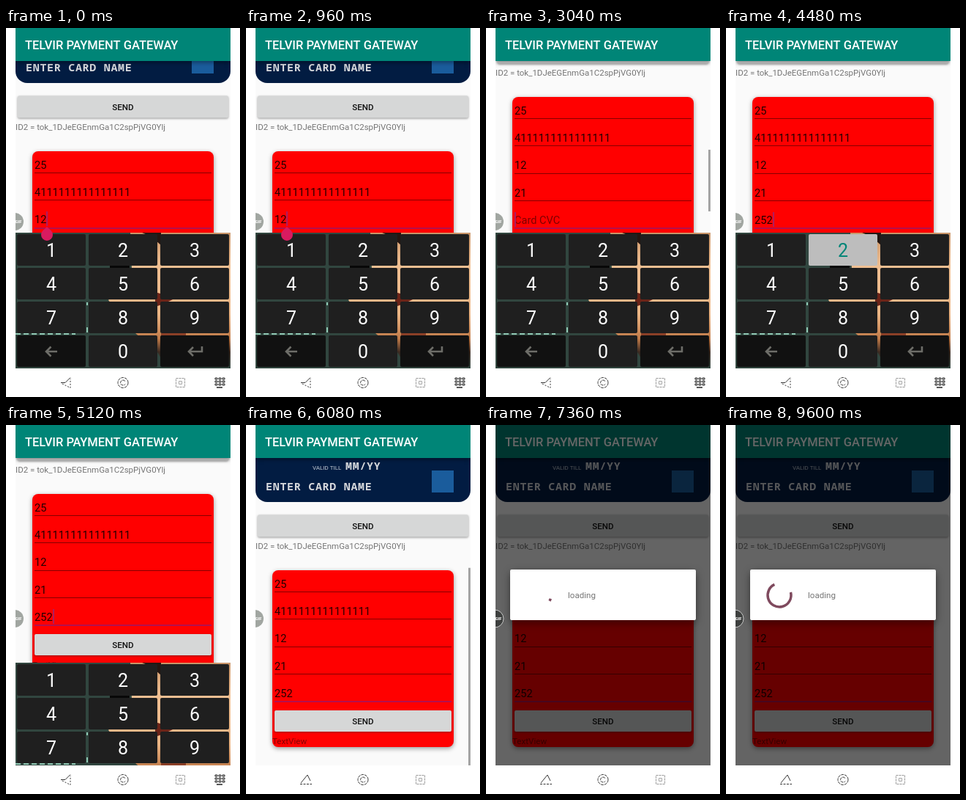
Recreate the animation shown at these times as an HTML page with a canvas. Size 320 by 503 pixels, loop 9.76 s.

```html
<!DOCTYPE html>
<html lang="en">
<head>
<meta charset="utf-8">
<title>Payment form</title>
<style>
  html, body { margin: 0; width: 100%; height: 100%; overflow: hidden; background: #fff; }
  canvas { display: block; width: 100vw; height: 100vh; }
</style>
</head>
<body>
<canvas id="stage" width="320" height="503"></canvas>
<script>
const ctx = document.getElementById('stage').getContext('2d');
const LOOP = 9760, STEP = 160;
const LEFT = 13, RIGHT = 307, WIDTH = RIGHT - LEFT, BAR_BOTTOM = 45, APP_BOTTOM = 464;
const KEYBOARD_TOP = 279, KEYBOARD_GONE = 5440, DIALOG_START = 6400;
const KEYS = ['1', '2', '3', '4', '5', '6', '7', '8', '9', 'back', '0', 'enter'];
const PRESSES = [[800, 'enter'], [2240, '2'], [2560, '1'], [2880, 'enter'],
                 [3520, '2'], [4000, '5'], [4480, '2'], [4960, 'enter']];

function box(x, y, w, h, color, radius = 0, shadow = 0) {
  ctx.save();
  if (shadow) {
    ctx.shadowColor = 'rgba(0,0,0,.4)';
    ctx.shadowBlur = shadow;
    ctx.shadowOffsetY = shadow / 3;
  }
  ctx.fillStyle = color;
  ctx.beginPath();
  ctx.roundRect(x, y, w, h, radius);
  ctx.fill();
  ctx.restore();
}

function text(str, x, y, size, color, { weight = 400, align = 'left', family = 'Roboto, sans-serif', spacing = 0, stretch = 'normal' } = {}) {
  ctx.font = `${weight} ${size}px ${family}`;
  ctx.fontStretch = stretch;
  ctx.letterSpacing = spacing + 'px';
  ctx.textAlign = align;
  ctx.fillStyle = color;
  ctx.fillText(str, x, y);
}

function stroke(path, color, width = 1, dash = []) {
  ctx.strokeStyle = color;
  ctx.lineWidth = width;
  ctx.setLineDash(dash);
  ctx.stroke(new Path2D(path));
  ctx.setLineDash([]);
}

function fill(path, color) {
  ctx.fillStyle = color;
  ctx.fill(new Path2D(path));
}

function clipped(x, y, w, h, draw) {
  ctx.save();
  ctx.beginPath();
  ctx.rect(x, y, w, h);
  ctx.clip();
  draw();
  ctx.restore();
}

// The last value whose start time has been reached.
const latest = (t, steps) => steps.reduce((value, [start, next]) => t >= start ? next : value, '');

const scrollShift = t => latest(t, [[0, 74], [1280, 18], [1440, 37], [2880, 18], [3040, 0], [KEYBOARD_GONE, 104]]);

function sendButton(x, y, w, h, pressed) {
  box(x, y, w, h, pressed ? '#b9baba' : '#d6d7d7', 2, 3);
  text('SEND', 160, y + h / 2 + 4, 11.6, '#111', { weight: 500, align: 'center' });
}

function bankCard(shift) {
  const mono = { family: '"Noto Sans Mono", monospace', weight: 700, spacing: 0.7 };
  box(LEFT, shift - 180, WIDTH, 181, '#021c42', 16);
  text('VALID TILL', 91, shift - 43, 8, '#c3cad4');
  text('MM/YY', 136, shift - 43.5, 15, '#d6d8dc', mono);
  text('ENTER CARD NAME', 27, shift - 15, 15, '#d6d8dc', mono);
  box(254, shift - 42, 30, 30, '#1a5c9c');
}

function form(t, shift) {
  const top = shift + 94, rowHeight = 37.3;
  const focus = latest(t, [[0, 2], [1280, 3], [2880, 4]]);
  const values = ['25', '4111111111111111', '12',
    latest(t, [[2240, '2'], [2560, '21']]),
    latest(t, [[3520, '2'], [4000, '25'], [4480, '252']])];
  const hints = ['', '', '', 'Card Year', 'Card CVC'];

  box(36, top, 248, 241, '#f00', 8, 6);
  values.forEach((value, i) => {
    const y = top + rowHeight * i, focused = i === focus;
    text(value || hints[i], 39, y + 23.7, 14.6, value ? '#210000' : '#7f0000');
    box(39, Math.round(y + 29.1), 242, focused ? 2 : 1, focused ? '#b3104f' : '#850000');
    const cursorOn = t < 160 || (t >= 800 && t < KEYBOARD_GONE);
    if (focused && cursorOn) box(39 + Math.round(ctx.measureText(value).width), Math.round(y + 7.5), 2, 20, '#b01c60');
  });
  sendButton(39, top + 191, 242, 29, t === 6240);
  text('TextView', 36, top + 237, 11.6, '#850000');
}

function scrollbar(t, shift, bottom) {
  const alpha = latest(t, [[0, 0], [1280, 1], [1600, .5], [1760, 0], [2880, 1], [3520, 0], [KEYBOARD_GONE, 1], [DIALOG_START, 0]]);
  const view = bottom - BAR_BOTTOM, content = 652;
  box(304, BAR_BOTTOM + (337 - shift) / content * view, 3, view * view / content, `rgba(150,150,150,${alpha * .85})`);
}

function keyboardPhoto() {
  const warm = ctx.createLinearGradient(0, KEYBOARD_TOP, 0, APP_BOTTOM);
  [[0, '#c99468'], [.25, '#efbf92'], [.6, '#e9b484'], [.78, '#c07a48'], [.88, '#3a2a22'], [1, '#31463f']]
    .forEach(stop => warm.addColorStop(...stop));
  box(LEFT, KEYBOARD_TOP, WIDTH, 185, '#31463f');
  fill('M170 279L172 330L140 371L178 417L206 440L220 464H307V279Z', warm);
  box(142, 324, 27, 3, '#080808');
  fill('M186 279H212V296L198 284Z', '#241611');
  fill('M204 360L232 368L216 376L204 380Z', '#6b2418');
  box(212, 416, 34, 4, '#8b3f27');
  stroke('M13 417H95M111 374V378M111 408V417', '#8fc7b3', 2, [7, 4]);
}

function keyboard(t) {
  keyboardPhoto();
  KEYS.forEach((key, i) => {
    const x = 15 + 98 * (i % 3), y = 281 + 46 * Math.floor(i / 3);
    const pressed = PRESSES.some(([start, name]) => name === key && t === start);
    const special = key.length > 1;
    const cx = x + 47, cy = y + 22;
    box(x, y, 94, 43, pressed ? '#bdbdbd' : special ? '#111' : '#1f1f1f', 2);
    const color = pressed ? '#008577' : special ? '#6d6d68' : '#fff';
    if (key === 'back') stroke(`M${cx + 8} ${cy}h-15m6.5 -6.5l-6.5 6.5l6.5 6.5`, color, 2.6);
    else if (key === 'enter') stroke(`M${cx + 10} ${cy - 7}v7h-18m6 -6l-6 6l6 6`, color, 2.6);
    else text(key, cx, cy + 9, 25, color, { align: 'center', stretch: 'condensed' });
  });
}

const cursorHandle = () => fill('M56 271L61.7 276.3A8 8 0 1 1 50.3 276.3Z', '#d81b60');

function bubble(dark) {
  ctx.beginPath();
  ctx.arc(12, 264, 12, 0, 7);
  ctx.fillStyle = dark ? '#3d3f3e' : 'rgba(145,150,145,.85)';
  ctx.fill();
  if (dark) {
    ctx.strokeStyle = '#c8c8c8';
    ctx.lineWidth = 1;
    ctx.stroke();
  }
  text('GIF', 17, 266, 6, '#fff', { weight: 700, align: 'center' });
}

function titleBar() {
  box(LEFT, 0, WIDTH, BAR_BOTTOM, '#008577', 0, 6);
  text('TELVIR PAYMENT GATEWAY', 26, 29, 16.5, '#fff', { weight: 500 });
}

function navigation(open) {
  box(0, APP_BOTTOM, 320, 39, '#fff');
  if (open) {
    stroke('M75 483.5H81L88 476.5', '#333');
    stroke('M77 485L88 490.5V478', '#333', 1, [2, 2]);
    for (let i = 0; i < 9; i++) {
      const x = 286 + 5 * (i % 3), y = 477 + 4 * Math.floor(i / 3);
      stroke(`M${x} ${y}h3v2h-3z`, '#222');
    }
    stroke('M288 490h8', '#222', 1.5);
  } else {
    stroke('M75 488L84 477L88 485', '#333');
    stroke('M74 489.5H90', '#333', 1, [3, 1.5]);
  }
  stroke('M167 483.5a7 7 0 1 1 -14 0a7 7 0 1 1 14 0M163 481.5a3.5 3.5 0 1 0 0 4', '#333', 1, [4, 1]);
  stroke('M232.5 477.5h12v12h-12z', '#999', 1, [3, 1]);
  stroke('M236.5 481.5h4v4h-4z', '#aaa');
}

// Standard material easing: cubic-bezier(.4, 0, .2, 1), solved by bisection.
function ease(x) {
  let low = 0, high = 1, u = .5;
  for (let i = 0; i < 24; i++) {
    u = (low + high) / 2;
    const at = 1.2 * (1 - u) ** 2 * u + .6 * (1 - u) * u * u + u ** 3;
    if (at < x) low = u; else high = u;
  }
  return 3 * (1 - u) * u * u + u ** 3;
}

function spinner(t) {
  const since = t - 7360;
  const phase = (.87 + since * 1.6 / 1333 + 10) % 1;
  const tail = .75 * ease(Math.max(0, phase * 2 - 1));
  const head = .75 * ease(Math.min(1, phase * 2));
  const turn = (131 + since * .2697) / 360 + phase / 4 - .25;
  ctx.strokeStyle = '#7f4a5e';
  ctx.lineWidth = 3.5;
  ctx.beginPath();
  ctx.arc(73, 232, 16, (turn + tail) * 2 * Math.PI, (turn + Math.max(head, tail + .02)) * 2 * Math.PI);
  ctx.stroke();
}

function dialog(t) {
  ctx.save();
  ctx.globalAlpha = t < DIALOG_START + STEP ? .5 : 1;
  box(LEFT, 0, WIDTH, APP_BOTTOM, 'rgba(0,0,0,.6)');
  box(33, 197, 254, 69, '#fff', 2, 12);
  text('loading', 112, 236, 11.6, '#757575');
  spinner(t);
  ctx.restore();
}

function render(time) {
  const t = Math.floor(time % LOOP / STEP) * STEP;
  const shift = scrollShift(t), open = t < KEYBOARD_GONE, waiting = t >= DIALOG_START;

  box(0, 0, 320, 503, '#fff');
  clipped(LEFT, 0, WIDTH, APP_BOTTOM, () => {
    box(LEFT, 0, WIDTH, APP_BOTTOM, '#fafafa');
    bankCard(shift);
    sendButton(16, shift + 18.5, 288, 30);
    text('ID2 = tok_1DJeEGEnmGa1C2spPjVG0Ylj', LEFT, shift + 65, 11.5, '#757575');
    form(t, shift);
    scrollbar(t, shift, open ? KEYBOARD_TOP : APP_BOTTOM);
    titleBar();
    if (open) {
      ctx.save();
      ctx.translate(0, latest(t, [[0, 0], [5120, 45], [5280, 125]]));
      keyboard(t);
      ctx.restore();
    }
    if (t < 1280) cursorHandle();
    if (waiting) dialog(t);
    bubble(waiting);
  });
  navigation(open);
}

const begin = performance.now();
function tick() {
  render(performance.now() - begin);
  requestAnimationFrame(tick);
}
tick();
</script>
</body>
</html>
```
